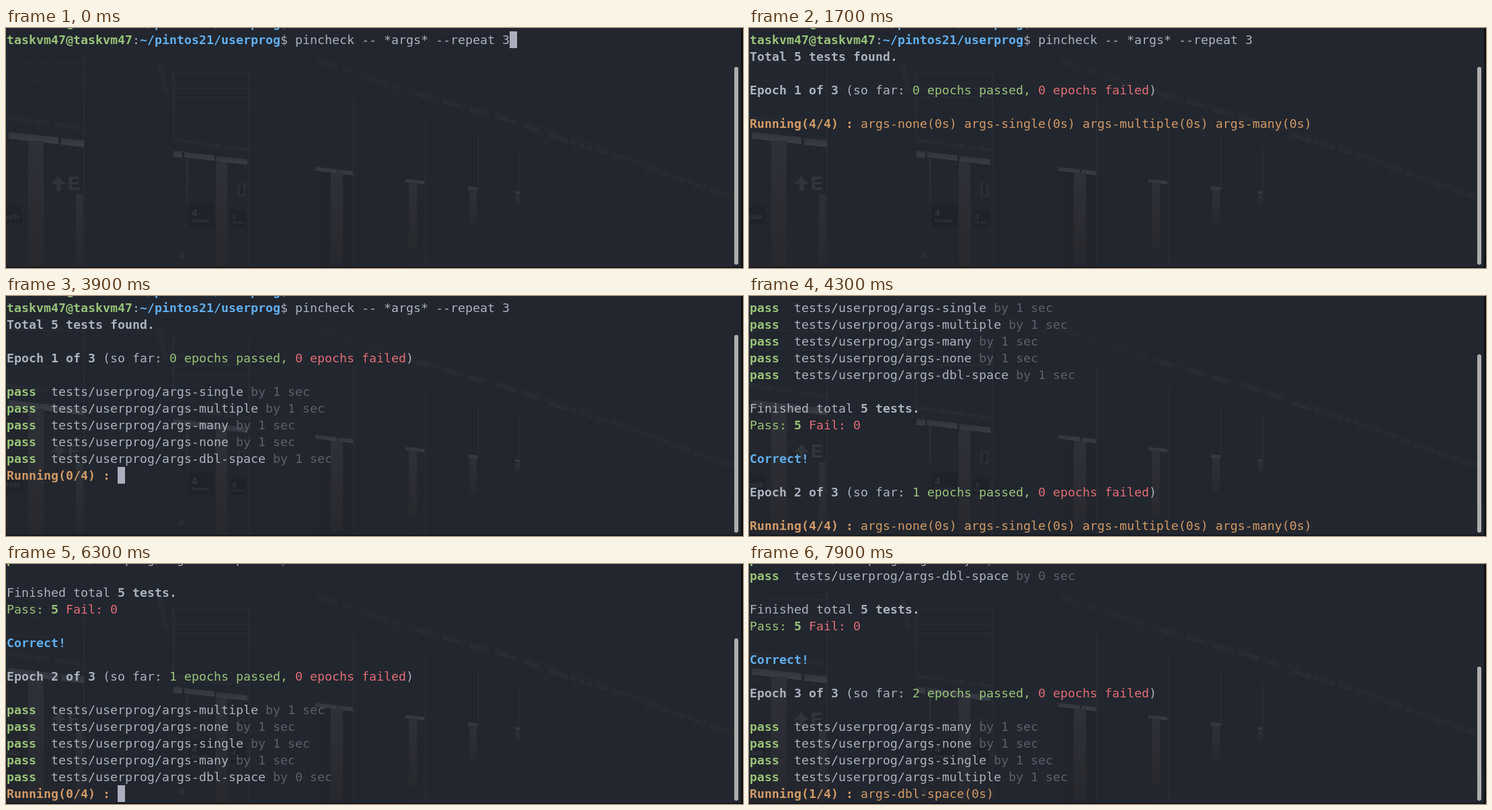
Animation of 1096 by 358 pixels, one loop 8 s. Source, as an HTML page:

```html
<!DOCTYPE html>
<html lang="en">
<head>
<meta charset="utf-8">
<title>Terminal test run</title>
<style>
  html, body { margin: 0; width: 100%; height: 100%; overflow: hidden; background: #22262e; }
  svg { display: block; width: 1096px; height: 358px; }
  #screen text {
    font: 18.27px "DejaVu Sans Mono", "Noto Sans Mono", monospace;
    white-space: pre; font-variant-ligatures: none; fill: #abb2bf;
  }
  #screen .bold { font-weight: 700; }
  #screen .green { fill: #98c379; }
  #screen .red { fill: #e06c75; }
  #screen .orange { fill: #d19a66; }
  #screen .blue { fill: #61afef; }
  #screen .dim { fill: #5a5f6a; }
  #station text { font-family: "Liberation Sans", sans-serif; font-weight: 700; fill: #33363d; }
</style>
</head>
<body>
<svg viewBox="0 0 1096 358" xmlns="http://www.w3.org/2000/svg">
  <defs>
    <linearGradient id="lamp" x1="0" y1="0" x2="0" y2="1">
      <stop offset="0" stop-color="#31343c"/>
      <stop offset="1" stop-color="#3a3d46"/>
    </linearGradient>
    <linearGradient id="post" x1="0" y1="0" x2="0" y2="1">
      <stop offset="0" stop-color="#2f3138"/>
      <stop offset="1" stop-color="#27292f"/>
    </linearGradient>
    <filter id="soft"><feGaussianBlur stdDeviation=".6"/></filter>
  </defs>
  <rect width="1096" height="358" fill="#22262e"/>
  <g id="station" filter="url(#soft)"></g>
  <rect y="356" width="1096" height="2" fill="#14171c"/>
  <rect x="1093" width="3" height="358" fill="#0e1014"/>
  <g id="screen"></g>
  <rect id="cursor" width="11" height="25" fill="#abafbd"/>
  <rect id="thumb" x="1083" width="6" rx="3" fill="#adadad"/>
</svg>
<script>
const LOOP = 8000, CELL = 11, ROW = 25, ROWS = 14, LEFT = 1, TOP = 5;
const $ = id => document.getElementById(id);

// Dim station backdrop
const poly = (points, fill) => `<polygon points="${points}" fill="${fill}"/>`;
const box = (x, y, w, h, fill) => `<rect x="${x}" y="${y}" width="${w}" height="${h}" fill="${fill}"/>`;
const path = (d, stroke, width, dash = "none") =>
  `<path d="${d}" fill="none" stroke="${stroke}" stroke-width="${width}" stroke-dasharray="${dash}"/>`;
const lamp = (x, y, w, h) =>
  poly(`${x},${y} ${x + w},${y + w * .11} ${x + w},${y + w * .11 + h} ${x},${y + h}`, "url(#lamp)");
const label = (x, y, size, text) => `<text x="${x}" y="${y}" font-size="${size}">${text}</text>`;

function drawStation() {
  let s = "";
  // Bays between the dark pillars
  s += poly("0,160 116,176 116,356 0,356", "#23262d");
  s += poly("250,190 362,204 362,356 250,356", "#23262d");
  s += poly("460,212 517,220 517,356 460,356", "#22252c");
  s += poly("560,356 1092,308 1092,356", "#24272f");
  // Ceiling slats
  for (const [y, c] of [[50, "#292c34"], [65, "#262a31"], [78, "#272a32"], [93, "#252931"], [107, "#262930"]])
    s += path(`M0 ${y}L116 ${y + 3}`, c, 1.5);
  for (const y of [67, 90, 103, 118]) s += path(`M250 ${y}H361`, "#292c34", 1.5);
  s += path("M0 133L116 150", "#272a32", 7, "38 4 22 9");
  s += path("M250 167L361 182", "#282b33", 5, "26 5 12 3");
  s += path("M228 50L238 95", "#272a32", 8);
  // Pillar edges
  for (const [x, y, h] of [[116, 40, 316], [249, 60, 105], [362, 65, 291], [517, 106, 250], [624, 137, 219], [702, 160, 80], [764, 178, 82]])
    s += path(`M${x} ${y}v${h}`, "#2a2d35", 1.6);
  // Lamps and the posts below them
  for (const [x, y, w, h] of [[4, 155, 74, 10], [82, 164, 34, 10], [249, 183, 13, 9], [265, 185, 45, 8], [313, 191, 46, 8],
    [460, 207, 32, 6], [494, 211, 22, 6], [594, 225, 28, 5], [687, 236, 14, 5], [757, 243, 7, 4]]) s += lamp(x, y, w, h);
  for (const [x, y, w, h] of [[33, 168, 23, 188], [104, 248, 10, 108], [312, 200, 17, 156], [268, 195, 3, 66],
    [483, 216, 18, 135], [599, 230, 12, 100], [689, 241, 11, 52], [757, 249, 6, 13]]) s += box(x, y, w, h, "url(#post)");
  // Small sign boards
  s += poly("78,221 89,233 82,233 82,243 75,243 75,233 67,233", "#303339");
  s += label(92, 241, 27, "E");
  s += box(0, 266, 24, 26, "#1f2229") + label(0, 285, 10, "rade");
  s += box(272, 262, 38, 35, "#1f2229") + label(276, 281, 15, "4") + label(276, 290, 8, "Parade");
  s += box(333, 272, 24, 25, "#1f2229") + label(336, 286, 11, "4") + label(335, 292, 6, "Parade");
  s += box(344, 231, 12, 20, "#2a2d34") + box(348, 234, 5, 14, "#20232a");
  s += box(257, 335, 8, 8, "#2a2d34");
  // Receding ceiling edge
  s += path("M462 48Q600 96 740 135T1000 225L1085 254", "#25282f", 11, "34 5 19 8 9 4");
  s += path("M610 98L740 135L840 171", "#292c33", 6, "22 19 30 12");
  s += path("M840 171L925 196L1000 225L1085 254", "#292c33", 4, "9 6 5 4");
  // Far pillars
  for (let i = 0; i < 15; i++) {
    const x = 805 + 280 * (1 - Math.pow(.86, i));
    s += path(`M${x} ${160 + (x - 805) * .34}V${334 - (x - 805) * .08}`, "#252830", Math.max(1.2, 4 - i * .2));
  }
  for (const x of [440, 580, 675, 735]) s += path(`M${x} ${45 + (x - 440) * .33}V340`, "#24272f", 8);
  $("station").innerHTML = s;
}

// Log contents: every line is a list of [text, classes]
const prompt = [["taskvm47@taskvm47", "green bold"], [":", ""], ["~/pintos21/userprog", "blue bold"], ["$ ", ""]];
const slots = ["none", "single", "multiple", "many"];
const epochs = [
  { start: 1300, done: { single: 2500, multiple: 2700, many: 2700, none: 2900, "dbl-space": 3900 } },
  { start: 4100, done: { multiple: 5300, none: 5500, single: 5500, many: 5500, "dbl-space": 6300 } },
  { start: 6500, done: { many: 7700, none: 7900, single: 7900, multiple: 7900, "dbl-space": 9000 } }
];
const POLL = 200;

function epochLines(epoch, index, t) {
  const { start, done } = epoch;
  const first = Object.keys(done)[0];
  const began = name => name === "dbl-space" ? done[first] : start;
  const lines = [
    [[`Epoch ${index + 1} of 3`, "bold"], [" (so far: ", ""], [`${index} epochs passed,`, "green"],
      [" ", ""], ["0 epochs failed", "red"], [")", ""]],
    []
  ];
  for (const name in done) {
    if (t < done[name]) continue;
    const sec = Math.floor((done[name] - began(name) - 1) / 1000);
    lines.push([["pass", "green bold"], [`  tests/userprog/args-${name} `, ""], [`by ${sec} sec`, "dim"]]);
  }
  if (t >= done["dbl-space"] + POLL) {
    lines.push([], [["Finished total ", ""], ["5 tests.", "bold"]],
      [["Pass: ", "green"], ["5", "green bold"], [" Fail: 0", "red"]],
      [], [["Correct!", "blue bold"]], []);
  } else {
    const jobs = slots
      .map(name => name === first && t >= done[first] ? "dbl-space" : name)
      .filter(name => t < done[name]);
    const list = jobs.map(name => {
      const age = t - began(name);
      return `args-${name}${age < POLL ? "" : `(${Math.floor(age / 1000)}s)`} `;
    });
    lines.push([[`Running(${jobs.length}/4) :`, "orange bold"], [" " + list.join(""), "orange"]]);
  }
  return lines;
}

function logAt(t) {
  const lines = [prompt, [...prompt, ["pincheck -- *args* --repeat 3", ""]]];
  if (t >= 1300) lines.push([["Total 5 tests found.", "bold"]], []);
  else if (t >= 1100) lines.push([]);
  epochs.forEach((epoch, i) => {
    if (t >= epoch.start) lines.push(...epochLines(epoch, i, t));
  });
  return lines;
}

const cursorOn = t => t < 1700
  ? t < 400 || t >= 1000
  : Math.floor((t - 1700) / 600) % 2 === 1;

const columns = line => line.reduce((n, [text]) => n + text.length, 0);

function lineMarkup(line, row) {
  let col = 0;
  return line.map(([text, cls]) => {
    const x = LEFT + col * CELL;
    col += text.length;
    return `<text x="${x}" y="${TOP + row * ROW + 19}" class="${cls}" xml:space="preserve">${text}</text>`;
  }).join("");
}

let shown = "";
function render(t) {
  const lines = logAt(t);
  const last = lines.length - 1;
  const top = Math.max(1, lines.length - ROWS);
  const markup = lines.map((line, i) => i < top - 1 ? "" : lineMarkup(line, i - top)).join("");
  if (markup !== shown) $("screen").innerHTML = shown = markup;

  const cursor = $("cursor");
  cursor.setAttribute("x", LEFT + columns(lines[last]) * CELL);
  cursor.setAttribute("y", TOP + (last - top) * ROW);
  cursor.setAttribute("visibility", cursorOn(t) ? "visible" : "hidden");

  // The thumb shrinks as the scrollback grows
  const height = Math.round(13570 / (45 + top));
  $("thumb").setAttribute("y", 353 - height);
  $("thumb").setAttribute("height", height);
}

drawStation();
const origin = performance.now();
function tick() {
  render((performance.now() - origin) % LOOP);
  requestAnimationFrame(tick);
}
tick();
</script>
</body>
</html>
```
